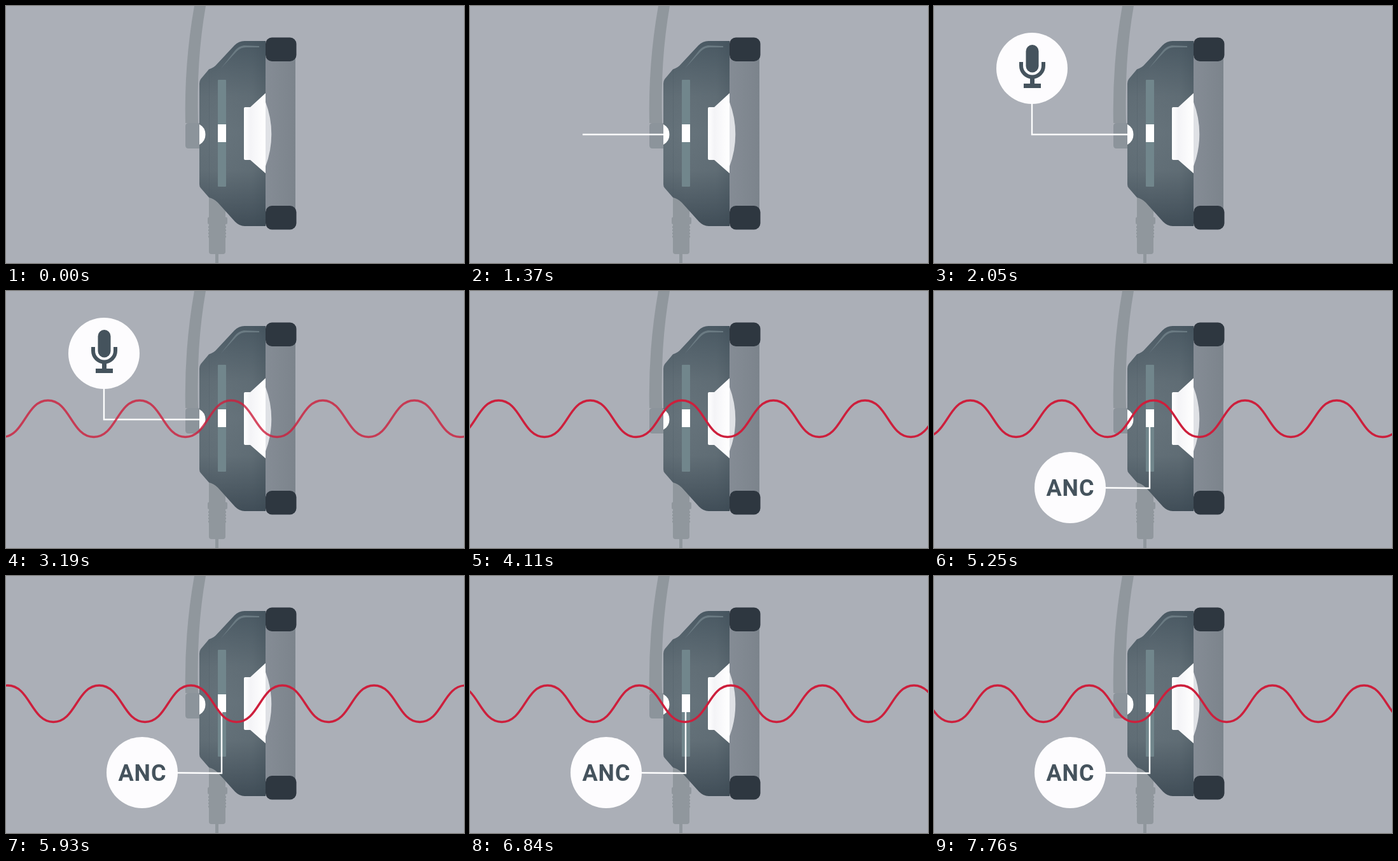
Animation, 720 px wide and 404 px high, one loop 7990 ms. Source, as an HTML page:

```html
<!DOCTYPE html>
<html lang="en">
<head>
<meta charset="utf-8">
<title>Active noise cancelling</title>
<style>
html, body { margin: 0; width: 100%; height: 100%; overflow: hidden; background: #abafb7; }
svg { display: block; width: 100vw; height: 100vh; }
.wire { fill: none; stroke: #fff; stroke-width: 2.4; stroke-dasharray: 1 2; }
.disc { fill: #fdfcfe; }
.ink { fill: #45535d; }
text { font: 700 36px Roboto, Arial, sans-serif; letter-spacing: 1px; text-anchor: middle; }
</style>
</head>
<body>
<svg viewBox="0 0 720 404">
  <defs>
    <linearGradient id="shell" x2="0" y2="1">
      <stop offset="0" stop-color="#4b5a64"/>
      <stop offset=".3" stop-color="#626f77"/>
      <stop offset=".5" stop-color="#66737b"/>
      <stop offset=".7" stop-color="#626f77"/>
      <stop offset="1" stop-color="#414e58"/>
    </linearGradient>
    <linearGradient id="side">
      <stop offset="0" stop-color="#33424c" stop-opacity=".06"/>
      <stop offset=".35" stop-color="#33424c" stop-opacity="0"/>
      <stop offset=".8" stop-color="#33424c" stop-opacity=".06"/>
      <stop offset="1" stop-color="#33424c" stop-opacity=".25"/>
    </linearGradient>
    <linearGradient id="pad">
      <stop offset="0" stop-color="#858c95"/>
      <stop offset="1" stop-color="#7c848c"/>
    </linearGradient>
    <linearGradient id="cone">
      <stop offset="0" stop-color="#fff"/>
      <stop offset=".3" stop-color="#f4f4f7"/>
      <stop offset="1" stop-color="#fff"/>
    </linearGradient>
    <path id="body" d="M408 55H375Q366 55 359 62L331 92Q327 97 319 99.500L306 115Q304 118 304 122V280Q304 284 306 286L319 301Q327 303 333 309L360 339Q367 346 375 346H408Z"/>
  </defs>

  <!-- headband and cable -->
  <g fill="#90979d">
    <path d="M296 0H314Q299 85 302 184H282Q280 90 296 0Z"/>
    <path fill="#8c949b" d="M287 184H304V224H287Q282 224 282 219V189Q282 184 287 184Z"/>
    <path d="M319 298H345V386Q345 390 341 390H323Q319 390 319 386Z"/>
    <rect x="317" y="332" width="31" height="11" rx="2"/>
    <path stroke="#90979d" stroke-width="3" d="M318 347.5H346M318 352.5H346M318 357.5H346M318 362.5H346"/>
    <rect x="329" y="390" width="5" height="14"/>
  </g>

  <!-- ear cup -->
  <rect x="408" y="80" width="47" height="240" fill="url(#pad)"/>
  <use href="#body" fill="url(#shell)"/>
  <use href="#body" fill="url(#side)"/>
  <path fill="#6b7b83" d="M338 98L360 70Q366 63 374 62L398 63V65H377Q369 65 363 71Z"/>
  <path stroke="#4c5b64" stroke-opacity=".3" d="M319.500 101V300"/>
  <g fill="#2e3740">
    <rect x="408" y="49.500" width="48.500" height="37.500" rx="10"/>
    <rect x="408" y="314" width="48.500" height="37.500" rx="10"/>
  </g>
  <rect x="333" y="116" width="13" height="168" rx="1" fill="#71868c"/>
  <rect x="333" y="186" width="13" height="28" fill="#fff"/>
  <path fill="#fff" d="M304 186A18.200 18.200 0 0 1 304 218Z"/>
  <path fill="#dfe1e5" d="M408 151A142 142 0 0 1 408 252Z"/>
  <path fill="url(#cone)" d="M376 159H384L408 137V263L384 242H376Q374 242 374 240V161Q374 159 376 159Z"/>

  <!-- callouts -->
  <path class="wire" id="micWire" pathLength="1" d="M304 202H154V98"/>
  <g id="micDisc">
    <circle class="disc" r="56"/>
    <rect class="ink" x="-9.500" y="-37" width="20" height="43.500" rx="10"/>
    <path fill="none" stroke="#45535d" stroke-width="6" d="M-17-10V-4A17.500 17.500 0 0 0 18-4V-10"/>
    <path class="ink" d="M-3 14H4V24H14V31H-13V24H-3Z"/>
  </g>
  <path class="wire" id="ancWire" pathLength="1" d="M339 214V310L214 309"/>
  <g id="ancDisc">
    <circle class="disc" r="56"/>
    <text class="ink" x=".5" y="13">ANC</text>
  </g>

  <path id="wave" fill="none" stroke="#cd1f3c" stroke-width="3.400"/>
</svg>
<script>
const LOOP = 7990, STEPS = 35, WAVELENGTH = 144;
const $ = id => document.getElementById(id);
const clamp = v => Math.max(0, Math.min(1, v));
const smooth = v => (v = clamp(v)) * v * (3 - 2 * v);

// [step, crest x]: the wave travels right at an almost constant speed
const crests = [[10, -56], [14, 66], [18, 189], [23, 345], [30, 554], [34, 676]];

function crestAt(step) {
  const i = Math.max(1, crests.findIndex(c => c[0] >= step));
  const [s0, x0] = crests[i - 1], [s1, x1] = crests[i];
  return x0 + (x1 - x0) * (step - s0) / (s1 - s0);
}

// The wire grows out of the device, then the disc swells at its end.
function callout(name, x, y, age) {
  $(name + 'Wire').style.strokeDashoffset = 1 - clamp((age + 1) / 2);
  $(name + 'Disc').setAttribute('transform', `translate(${x} ${y}) scale(${smooth(age / 3)})`);
}

// Alternating curves between crest and trough, rounder than a sine
const half = WAVELENGTH / 2, handle = 35;
let d = `M${-2 * WAVELENGTH} 172`;
for (let i = 0; i < 16; i++) {
  const dy = i % 2 ? -57.5 : 57.5;
  d += `c${handle} 0 ${half - handle} ${dy} ${half} ${dy}`;
}
$('wave').setAttribute('d', d);

function draw(now) {
  // The motion is held on even steps.
  const step = Math.min(STEPS - 1, Math.floor((now % LOOP + 10) * STEPS / LOOP));
  callout('mic', 154, 98, Math.min(step - 6, 2 * (17 - step)));
  callout('anc', 214, 309, step - 19);
  $('wave').setAttribute('opacity', clamp((step - 10) / 5));
  $('wave').setAttribute('transform', `translate(${crestAt(step) % WAVELENGTH} 0)`);
}

const start = performance.now();
function tick() {
  draw(performance.now() - start);
  requestAnimationFrame(tick);
}
tick();
</script>
</body>
</html>
```
